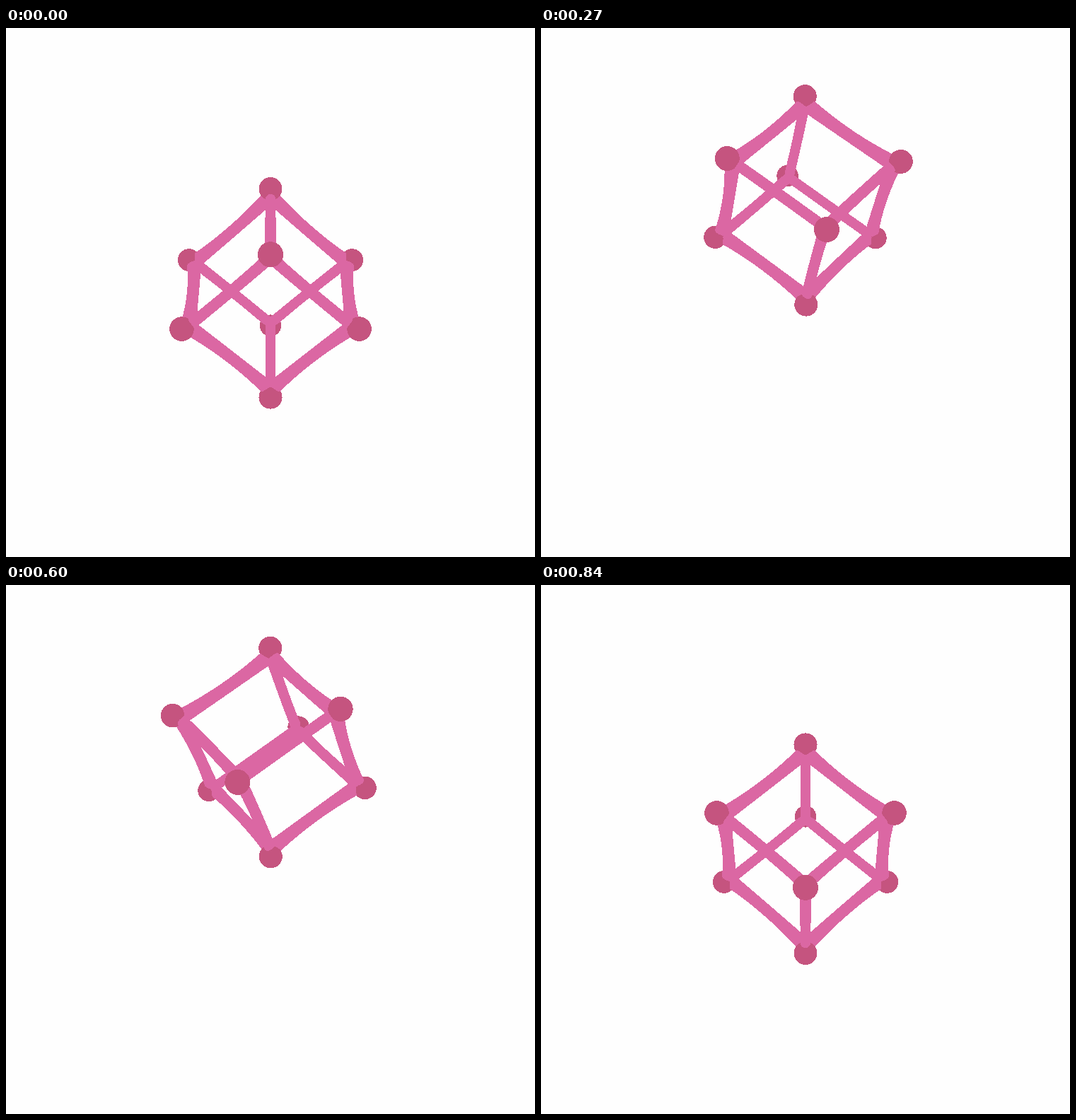
These frames come from a looping animation (748x748 px, 1200 ms). An HTML page with a canvas:

```html
<!DOCTYPE html>
<html lang="en">
<head>
<meta charset="utf-8">
<title>Spinning cube</title>
<style>
  html, body { margin: 0; width: 100%; height: 100%; overflow: hidden; background: #fefefe; }
  canvas { display: block; width: 100%; height: 100%; }
</style>
</head>
<body>
<canvas id="stage" width="748" height="748"></canvas>
<script>
const SIZE = 748, MID = 374;
const LOOP = 1200, STEP = 30, START = 30, PEAK = 480, END = 840;
const HALF = 85;           // half the cube's edge
const CAMERA = 1636;       // distance from eye to spin axis
const BALL = 16.5;
const TILT = 0.0058;       // small lean of the cube against the spin axis
const RINGS = 14, SIDES = 12;

const ctx = document.getElementById('stage').getContext('2d');
const image = ctx.createImageData(SIZE, SIZE);
const pixels = new Uint32Array(image.data.buffer);
const depth = new Float32Array(SIZE * SIZE);

const rgb = (r, g, b) => (255 << 24 | b << 16 | g << 8 | r) >>> 0;
const PAPER = rgb(254, 254, 254), STRUT = rgb(219, 103, 163), KNOB = rgb(197, 84, 127);

// Ease with flat ends; x1 and x2 are the handle lengths.
function ease(u, x1, x2) {
  if (u <= 0) return 0;
  if (u >= 1) return 1;
  let lo = 0, hi = 1;
  for (let i = 0; i < 30; i++) {
    const s = (lo + hi) / 2, r = 1 - s;
    if (3 * s * r * r * x1 + 3 * s * s * r * x2 + s * s * s < u) lo = s; else hi = s;
  }
  return lo * lo * (3 - 2 * lo);
}

function pose(t) {
  t = Math.min(t, END);
  const lift = t < PEAK
    ? 158.6 * ease((t - START) / (PEAK - START), 0.168, 0.259)
    : 158.6 - 157.1 * ease((t - PEAK) / (END - PEAK), 0.604, 0.643);
  return { turn: Math.PI * ease((t - 28) / 820, 0.197, 0.42), rise: lift - 0.75 };
}

// The cube stands on one corner and turns about its vertical diagonal.
function projector({ turn, rise }) {
  const sin = Math.sin(turn), cos = Math.cos(turn);
  return ([a, b, c]) => {
    const up = (a + b + c) / Math.sqrt(3);
    const front = (a + b - 2 * c) / Math.sqrt(6);
    const side = (a - b) / Math.SQRT2;
    const y = up + TILT * front, f = front - TILT * up;
    const z = f * cos - side * sin;
    const k = CAMERA / (CAMERA - z);
    return { x: MID + (side * cos + f * sin) * k, y: MID - (rise + y) * k, z, k };
  };
}

function plot(x, y, k, color) {
  const i = y * SIZE + x;
  if (k > depth[i]) { depth[i] = k; pixels[i] = color; }
}

const first = v => Math.max(0, Math.ceil(v - 0.5));
const last = v => Math.min(SIZE - 1, Math.floor(v - 0.5));

function triangle(p, q, r) {
  const area = (q.x - p.x) * (r.y - p.y) - (q.y - p.y) * (r.x - p.x);
  if (Math.abs(area) < 1e-6) return;
  const x0 = first(Math.min(p.x, q.x, r.x)), x1 = last(Math.max(p.x, q.x, r.x));
  const y0 = first(Math.min(p.y, q.y, r.y)), y1 = last(Math.max(p.y, q.y, r.y));
  for (let y = y0; y <= y1; y++) {
    for (let x = x0; x <= x1; x++) {
      const dx = x + 0.5 - p.x, dy = y + 0.5 - p.y;
      const v = (dx * (r.y - p.y) - dy * (r.x - p.x)) / area;
      const w = (dy * (q.x - p.x) - dx * (q.y - p.y)) / area;
      if (v < 0 || w < 0 || v + w > 1) continue;
      plot(x, y, p.k + v * (q.k - p.k) + w * (r.k - p.k), STRUT);
    }
  }
}

function ball(c) {
  const rad = BALL * c.k;
  for (let y = first(c.y - rad); y <= last(c.y + rad); y++) {
    for (let x = first(c.x - rad); x <= last(c.x + rad); x++) {
      const d = rad * rad - (x + 0.5 - c.x) ** 2 - (y + 0.5 - c.y) ** 2;
      if (d >= 0) plot(x, y, CAMERA / (CAMERA - c.z - Math.sqrt(d) / c.k), KNOB);
    }
  }
}

// A bar along one axis: straight inside, bowed outside, flaring at both ends.
function strutRings(axis, s1, s2) {
  const rings = [];
  for (let i = 0; i <= RINGS; i++) {
    const u = 0.88 * (2 * i / RINGS - 1);
    const outer = -2 + 6 * u * u, inner = -19;
    const ring = [];
    for (let j = 0; j < SIDES; j++) {
      const a = 2 * Math.PI * j / SIDES;
      const radial = ((outer + inner) + (outer - inner) * Math.cos(a)) / 2 / Math.SQRT2;
      const lateral = 7.3 * Math.sin(a) / Math.SQRT2;
      const point = [0, 0, 0];
      point[axis] = HALF * u;
      point[(axis + 1) % 3] = s1 * (HALF + radial + lateral);
      point[(axis + 2) % 3] = s2 * (HALF + radial - lateral);
      ring.push(point);
    }
    rings.push(ring);
  }
  return rings;
}

const signs = [-1, 1];
const struts = [0, 1, 2].flatMap(axis =>
  signs.flatMap(s1 => signs.map(s2 => strutRings(axis, s1, s2))));
const corners = signs.flatMap(a => signs.flatMap(b =>
  signs.map(c => [a * HALF, b * HALF, c * HALF])));

function draw(t) {
  const project = projector(pose(t));
  pixels.fill(PAPER);
  depth.fill(0);
  for (const strut of struts) {
    const rings = strut.map(ring => ring.map(project));
    for (let i = 0; i < RINGS; i++) {
      for (let j = 0; j < SIDES; j++) {
        const n = (j + 1) % SIDES;
        triangle(rings[i][j], rings[i][n], rings[i + 1][j]);
        triangle(rings[i][n], rings[i + 1][n], rings[i + 1][j]);
      }
    }
  }
  corners.forEach(corner => ball(project(corner)));
  ctx.putImageData(image, 0, 0);
}

let shown = -1;
const begin = performance.now();
function tick() {
  const elapsed = (performance.now() - begin) % LOOP;
  const t = Math.min(Math.floor(elapsed / STEP) * STEP, END);
  if (t !== shown) draw(shown = t);
  requestAnimationFrame(tick);
}
tick();
</script>
</body>
</html>
```
